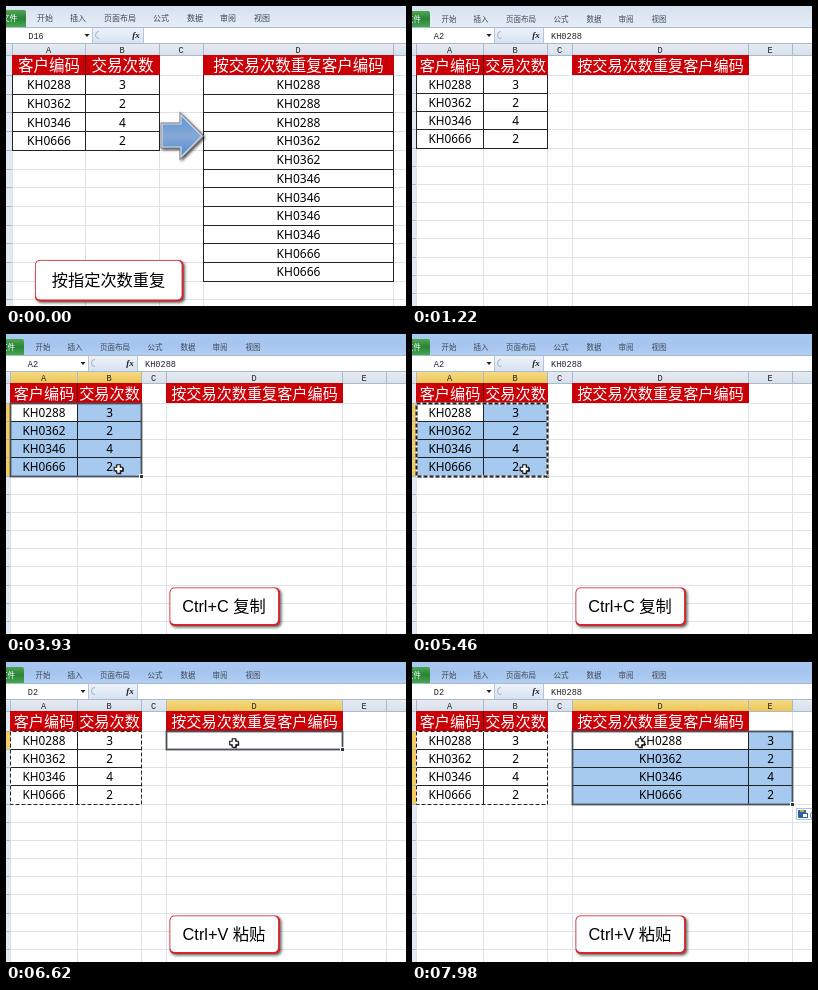
These frames come from a looping animation (400 by 300 pixels, 8000 ms). An HTML page with a canvas:

```html
<!DOCTYPE html>
<html lang="zh">
<head>
<meta charset="utf-8">
<style>
  html, body { margin: 0; width: 100%; height: 100%; overflow: hidden; background: #fff; }
  canvas { position: absolute; left: 0; top: 0; width: 400px; height: 300px; }
</style>
</head>
<body>
<canvas id="sheet" width="400" height="300"></canvas>
<canvas id="intro" width="400" height="300"></canvas>
<script>
const LOOP = 8000;
const CJK = '"Noto Sans CJK SC", "Noto Sans CJK", sans-serif';
const BODY = '"Noto Sans", sans-serif';
const MONO = '"Liberation Mono", monospace';
const CALLOUT = `"Liberation Sans", ${CJK}`;
const GRID = '#dde1e8', EDGE = '#a9bacf', RED = '#cb0007', BLUE = '#a6c9ef', INK = '#222';
const CODES = ['KH0288', 'KH0362', 'KH0346', 'KH0666'];
const COUNTS = [3, 2, 4, 2];
const REPEATED = CODES.flatMap((code, i) => Array(COUNTS[i]).fill(code));
const TABS = ['开始', '插入', '页面布局', '公式', '数据', '审阅', '视图'];
const TITLES = ['客户编码', '交易次数', '', '按交易次数重复客户编码'];
const TABLE = { c0: 0, c1: 1, r0: 0, r1: 3 };

const range = (from, to, n) => Array.from({ length: n }, (_, i) => from + (to - from) * i / (n - 1));
const TICKS = [0, ...range(500, 1220, 13), 1620, 1950, 2080, ...range(3080, 3530, 5), 3730, 3930,
  ...range(5460, 6160, 8), 6290, ...range(6490, 7010, 5), 7270, 7370, 7460, 7720, 7850, 7980];

const INTRO = {
  cols: [6, 79, 153, 197, 387, 440], top: 38, head: 50, first: 69, pitch: 18.7,
  tabs: [39, 72, 114, 155, 189, 222, 256], tabY: 12, tabSize: 8, file: [20, 4, 3.5],
  nameX: 30, arrowX: 81, fx: 130, size: 12, titleSize: 15.5
};
const MAIN = {
  cols: [4, 71, 135, 160, 336, 380, 424], top: 38, head: 50, first: 69, pitch: 18.15,
  tabs: [37, 69, 109, 149, 182, 214, 247], tabY: 13, tabSize: 7.5, file: [18, 5, 1.5],
  nameX: 27, arrowX: 77, fx: 124, size: 11.8, titleSize: 15.15
};

const sheet = document.getElementById('sheet').getContext('2d');
const introCanvas = document.getElementById('intro');
const intro = introCanvas.getContext('2d');
let g = sheet;

function rect(x, y, w, h, fill) {
  g.fillStyle = fill;
  g.fillRect(x, y, w, h);
}

function shade(y0, y1, ...colors) {
  const fill = g.createLinearGradient(0, y0, 0, y1);
  colors.forEach((c, i) => fill.addColorStop(i / (colors.length - 1), c));
  return fill;
}

function text(str, x, y, size, family, color = '#000', align = 'center', style = '') {
  g.font = `${style} ${size}px ${family}`;
  g.fillStyle = color;
  g.textAlign = align;
  g.textBaseline = 'alphabetic';
  g.fillText(str, x, y + size * 0.36);
}

function polygon(points, fill, stroke, width = 1) {
  g.beginPath();
  points.forEach(([x, y]) => g.lineTo(x, y));
  g.closePath();
  g.fillStyle = fill;
  g.fill();
  if (stroke) {
    g.strokeStyle = stroke;
    g.lineWidth = width;
    g.stroke();
  }
}

function roundBox(x, y, w, h, radius, fill) {
  g.beginPath();
  g.roundRect(x, y, w, h, radius);
  g.fillStyle = fill;
  g.fill();
}

function withShadow(size, draw) {
  g.save();
  g.shadowColor = 'rgba(0,0,0,.6)';
  g.shadowBlur = size * 2;
  g.shadowOffsetX = g.shadowOffsetY = size;
  draw();
  g.restore();
}

const rowY = (L, r) => Math.round(L.first + r * L.pitch);
const hline = (x0, x1, y, color) => rect(x0, y, x1 - x0, 1, color);
const vline = (x, y0, y1, color) => rect(x, y0, 1, y1 - y0, color);

function drawRibbon(L, focused, name, formula) {
  rect(0, 0, 400, 22, focused ? shade(0, 22, '#a9c8f1', '#a5c5ef', '#b3cff3')
                              : shade(0, 22, '#d6e1ef', '#dfe8f3', '#e5ecf5'));
  const [w, y, x] = L.file;
  roundBox(-5, y, w + 5, 21 - y, [0, 2, 0, 0], shade(y, 21, '#4fa552', '#2a8438', '#47a84d'));
  text('文件', x, L.tabY, L.tabSize, CJK, '#fff');
  TABS.forEach((tab, i) => text(tab, L.tabs[i], L.tabY, L.tabSize, CJK, '#40495a'));

  rect(0, 21, 400, L.top - 21, '#fff');
  hline(0, 400, 21, EDGE);
  const a = L.arrowX;
  rect(a + 5, 22, L.fx - a + 2, L.top - 22, shade(22, L.top, '#eef3fa', '#d5e1f0'));
  vline(a + 5, 22, L.top, '#b4c5dc');
  vline(L.fx + 7, 22, L.top, '#b4c5dc');
  polygon([[a - 2.5, 28], [a + 2.5, 28], [a, 31]], INK);
  g.beginPath();
  g.arc(a + 12, 29, 3.5, Math.PI / 2, Math.PI * 1.5);
  g.strokeStyle = '#a3b3c8';
  g.lineWidth = 1;
  g.stroke();
  text('fx', L.fx, 28.5, 9, '"Liberation Serif", serif', INK, 'center', 'italic bold');
  text(name, L.nameX, 29.5, 8.6, MONO, INK);
  text(formula, L.fx + 15, 29.5, 8.6, MONO, INK, 'left');
}

function drawGrid(L, sel) {
  const { cols, top, head } = L;
  rect(0, top, 400, head - top, shade(top, head, '#e6ebf2', '#d6dfea'));
  rect(0, head, cols[0], 300, '#e2eaf4');
  hline(0, 400, top - 1, EDGE);
  hline(0, 400, head - 1, EDGE);
  if (sel) {
    rect(cols[sel.c0], top, cols[sel.c1 + 1] - cols[sel.c0], head - top - 1, shade(top, head, '#f5d987', '#ecc650'));
    const y = rowY(L, sel.r0);
    rect(0, y, cols[0], rowY(L, sel.r1 + 1) - y, '#f3cc62');
  }
  for (let i = 0; i < cols.length - 1; i++) {
    vline(cols[i], top, head, EDGE);
    vline(cols[i], head, 300, GRID);
    if (i < 5) text('ABCDE'[i], (cols[i] + cols[i + 1]) / 2, (top + head) / 2, 8.6, MONO, INK);
  }
  for (let r = 0; rowY(L, r) < 300; r++) {
    hline(cols[0], 400, rowY(L, r), GRID);
    hline(0, cols[0], rowY(L, r), EDGE);
  }
}

function drawColumn(L, c, values) {
  const x0 = L.cols[c], x1 = L.cols[c + 1];
  values.forEach((value, r) => {
    hline(x0, x1, rowY(L, r + 1), INK);
    text(value, (x0 + x1) / 2 + 0.5, L.first + (r + 0.5) * L.pitch + 0.7, L.size, BODY);
  });
  const bottom = rowY(L, values.length) + 1;
  vline(x0, L.first, bottom, INK);
  vline(x1, L.first, bottom, INK);
}

function drawTitles(L) {
  TITLES.forEach((title, c) => {
    if (!title) return;
    const x = L.cols[c], w = L.cols[c + 1] - x;
    rect(x, L.head - 1, w + 1, L.first - L.head + 1, RED);
    if (c === 1) vline(x, L.head - 1, L.first, '#5c0a0a');
    text(title, x + w / 2 + 0.5, (L.head + L.first) / 2 - 0.3, L.titleSize, CJK, '#fff');
  });
}

function selectionBox(L, s) {
  const x = L.cols[s.c0], y = rowY(L, s.r0);
  return [x, y, L.cols[s.c1 + 1] - x, rowY(L, s.r1 + 1) - y];
}

function fillSelection(L, s) {
  if (s.c0 === s.c1 && s.r0 === s.r1) return;
  rect(...selectionBox(L, s), BLUE);
  rect(...selectionBox(L, { c0: s.c0, c1: s.c0, r0: s.r0, r1: s.r0 }), '#fff');
}

function strokeSelection(L, s) {
  const [x, y, w, h] = selectionBox(L, s);
  g.strokeStyle = '#4a505a';
  g.lineWidth = 1.8;
  g.strokeRect(x + 0.5, y + 0.5, w, h);
  rect(x + w - 2, y + h - 2, 4, 4, '#fff');
  rect(x + w - 1, y + h - 1, 3, 3, '#333');
}

function drawAnts(L, s, phase, width) {
  const [x, y, w, h] = selectionBox(L, s);
  g.lineWidth = width;
  g.strokeStyle = '#fff';
  g.strokeRect(x + 0.5, y + 0.5, w, h);
  g.setLineDash([4, 2]);
  g.lineDashOffset = -phase * 2;
  g.strokeStyle = INK;
  g.strokeRect(x + 0.5, y + 0.5, w, h);
  g.setLineDash([]);
}

function drawCallout(x, y, w, h, label, size) {
  withShadow(1.5, () => roundBox(x, y, w + 0.5, h + 0.5, 5, '#d0262c'));
  roundBox(x + 0.8, y + 0.8, w - 2.2, h - 2.2, 4.5, '#fff');
  text(label, x + w / 2 - 0.5, y + h / 2, size, CALLOUT);
}

function drawCursor(x, y) {
  const plus = (r, a) => [[-a, -r], [a, -r], [a, -a], [r, -a], [r, a], [a, a],
    [a, r], [-a, r], [-a, a], [-r, a], [-r, -a], [-a, -a]];
  const at = d => plus(4.3, 1.8).map(([px, py]) => [x + px + d, y + py + d]);
  polygon(at(0.9), '#111');
  polygon(at(0), '#fff', '#111', 1.1);
}

function drawArrow() {
  const shape = [[156, 118], [175, 118], [175, 109], [196, 130], [175, 151], [175, 141], [156, 141]];
  withShadow(1.5, () => polygon(shape, '#777', '#7d8085', 3));
  polygon(shape, shade(109, 151, '#5b93d8', '#86a9d6', '#4c8ada'), '#d5dae2', 1.2);
}

function drawPasteIcon() {
  rect(384, 146, 16, 12, '#f5f8fc');
  g.strokeStyle = '#b9c4d3';
  g.lineWidth = 1;
  g.strokeRect(384.5, 146.5, 20, 11);
  roundBox(386, 148, 8, 8, 1, '#2f5fa8');
  rect(388, 148, 4, 2, '#c9a34a');
  rect(390, 151, 6, 5, '#fff');
  g.strokeStyle = '#2f5fa8';
  g.strokeRect(390.5, 151.5, 5, 4);
  text('(', 399, 152, 7, BODY, '#555');
}

function drawIntro() {
  g = intro;
  rect(0, 0, 400, 300, '#fff');
  drawRibbon(INTRO, false, 'D16', '');
  drawGrid(INTRO);
  drawTitles(INTRO);
  drawColumn(INTRO, 0, CODES);
  drawColumn(INTRO, 1, COUNTS);
  drawColumn(INTRO, 3, REPEATED);
  drawArrow();
  drawCallout(29, 254, 148, 41, '按指定次数重复', 16.2);
}

const clamp = v => Math.min(1, Math.max(0, v));
const mix = (a, b, k) => a.map((v, i) => v + (b[i] - v) * k);
const START = [46.5, 80.5], CORNER = [112.5, 135], GOAL = [228, 81];

function cursorAt(t) {
  if (t < 3530) return mix(START, CORNER, clamp((t - 3080) / 450));
  const k = clamp((t - 5560) / 600);
  return mix(CORNER, GOAL, k * k * (3 - 2 * k));
}

function selectionAt(t, [x, y]) {
  if (t < 1950) return null;
  if (t >= 6750) return { c0: 3, c1: 4, r0: 0, r1: 3 };
  if (t >= 6290) return { c0: 3, c1: 3, r0: 0, r1: 0 };
  if (t >= 3530) return TABLE;
  return { c0: 0, c1: x > MAIN.cols[1] ? 1 : 0, r0: 0, r1: Math.floor((y - MAIN.first) / MAIN.pitch) };
}

function drawMain(t, phase) {
  g = sheet;
  const cursor = cursorAt(t);
  const sel = selectionAt(t, cursor);
  const pasted = t >= 6750, moved = t >= 6290;
  const dragging = t > 3080 && t < 3930;
  const name = moved ? 'D2' : dragging ? `${sel.r1 + 1}R x ${sel.c1 + 1}C` : 'A2';

  rect(0, 0, 400, 300, '#fff');
  drawRibbon(MAIN, t >= 1950, name, moved && !pasted ? '' : 'KH0288');
  drawGrid(MAIN, sel);
  if (sel) fillSelection(MAIN, sel);
  drawTitles(MAIN);
  drawColumn(MAIN, 0, CODES);
  drawColumn(MAIN, 1, COUNTS);
  if (pasted) {
    drawColumn(MAIN, 3, CODES);
    drawColumn(MAIN, 4, COUNTS);
    drawPasteIcon();
  }
  if (sel) strokeSelection(MAIN, sel);
  if (t >= 5460) drawAnts(MAIN, TABLE, phase, moved ? 1 : 2);
  if (t >= 3730 && t < 5660) drawCallout(163.5, 253.5, 110, 38, 'Ctrl+C 复制', 16.3);
  if (t >= 6620) drawCallout(163.5, 253.5, 110, 38, 'Ctrl+V 粘贴', 16.3);
  if (t >= 1620) drawCursor(...cursor);
}

const begin = performance.now();
let shown = -1;
function frame() {
  const t = (performance.now() - begin) % LOOP;
  const index = TICKS.findLastIndex(tick => tick <= t);
  if (index !== shown) {
    shown = index;
    const held = TICKS[index];
    introCanvas.style.opacity = held < 500 ? 1 : clamp(1 - (held - 440) / 780);
    drawMain(held, index);
  }
  requestAnimationFrame(frame);
}

drawIntro();
frame();
</script>
</body>
</html>
```
